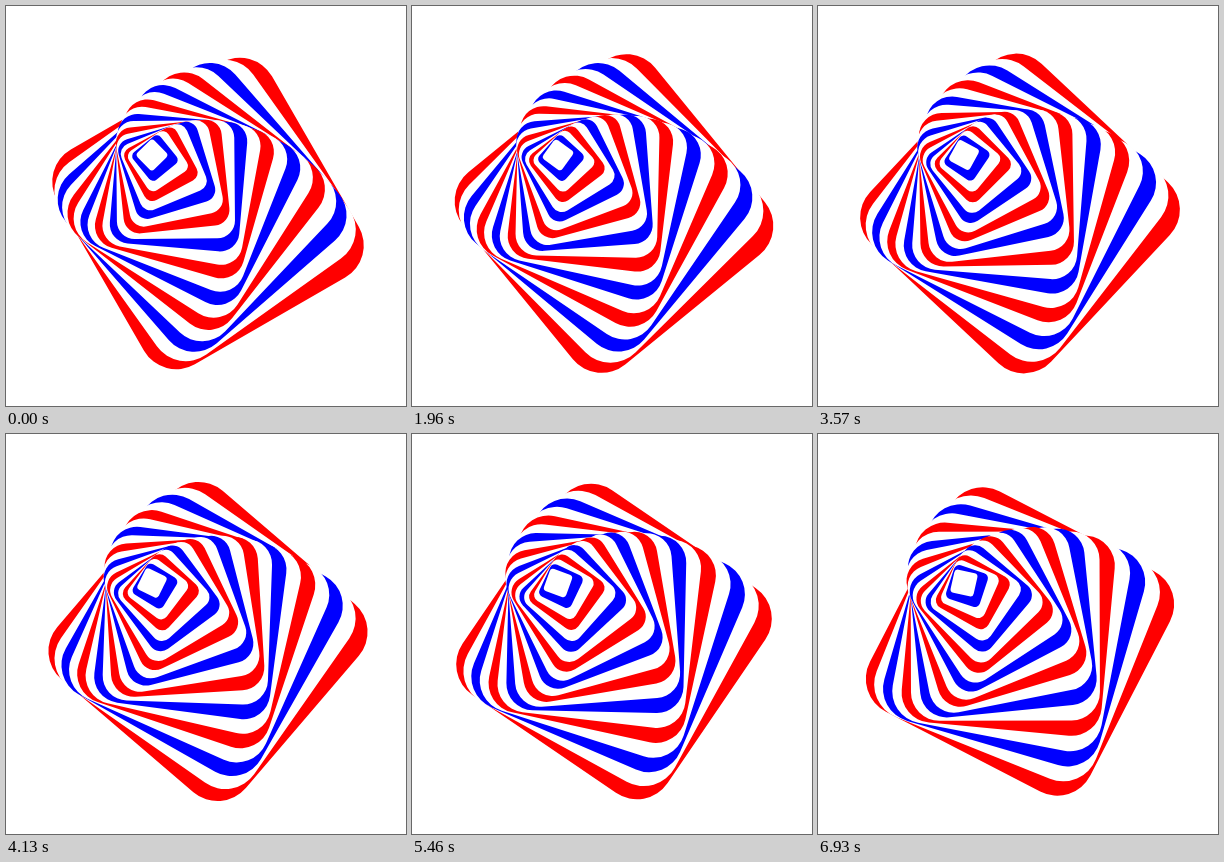
Animation of 400 by 400 pixels, one loop 7 s. Source, as an HTML page:

```html
<!DOCTYPE html>
<html>
<head>
<meta charset="utf-8">
<style>
html, body { margin: 0; width: 100%; height: 100%; overflow: hidden; background: #fff; }
svg { display: block; width: 100vw; height: 100vh; }
</style>
</head>
<body>
<svg id="stage" viewBox="0 0 400 400"></svg>
<script>
const LAYERS = 20, STEP_MS = 70, STEPS = 100;
const TWIST = 5.5;   // degrees between neighbouring squares
const SPIN = -0.33;  // degrees per step
const COLORS = ['#fff', '#00f', '#fff', '#f00'];
const NS = 'http://www.w3.org/2000/svg';
const stage = document.getElementById('stage');
const mix = (a, b, u) => a + (b - a) * u;

function makeSquare(i) {
  const u = i / (LAYERS - 1);
  const size = mix(23.6, 248, u);
  const x = mix(146, 202, u), y = mix(149, 207.5, u);
  const node = document.createElementNS(NS, 'rect');
  const attrs = { x: -size / 2, y: -size / 2, width: size, height: size,
                  rx: size * 0.15, fill: COLORS[i % 4] };
  for (const key in attrs) node.setAttribute(key, attrs[key]);
  stage.prepend(node); // smaller squares stay on top
  return { node, x, y, angle: 60 - (LAYERS - 1 - i) * TWIST };
}

const squares = Array.from({ length: LAYERS }, (_, i) => makeSquare(i));

function draw(ms) {
  const step = Math.floor(ms / STEP_MS) % STEPS;
  for (const { node, x, y, angle } of squares) {
    node.setAttribute('transform', `translate(${x} ${y}) rotate(${angle + SPIN * step})`);
  }
}

const start = performance.now();
function tick() {
  draw(performance.now() - start);
  requestAnimationFrame(tick);
}
draw(0);
requestAnimationFrame(tick);
</script>
</body>
</html>
```
